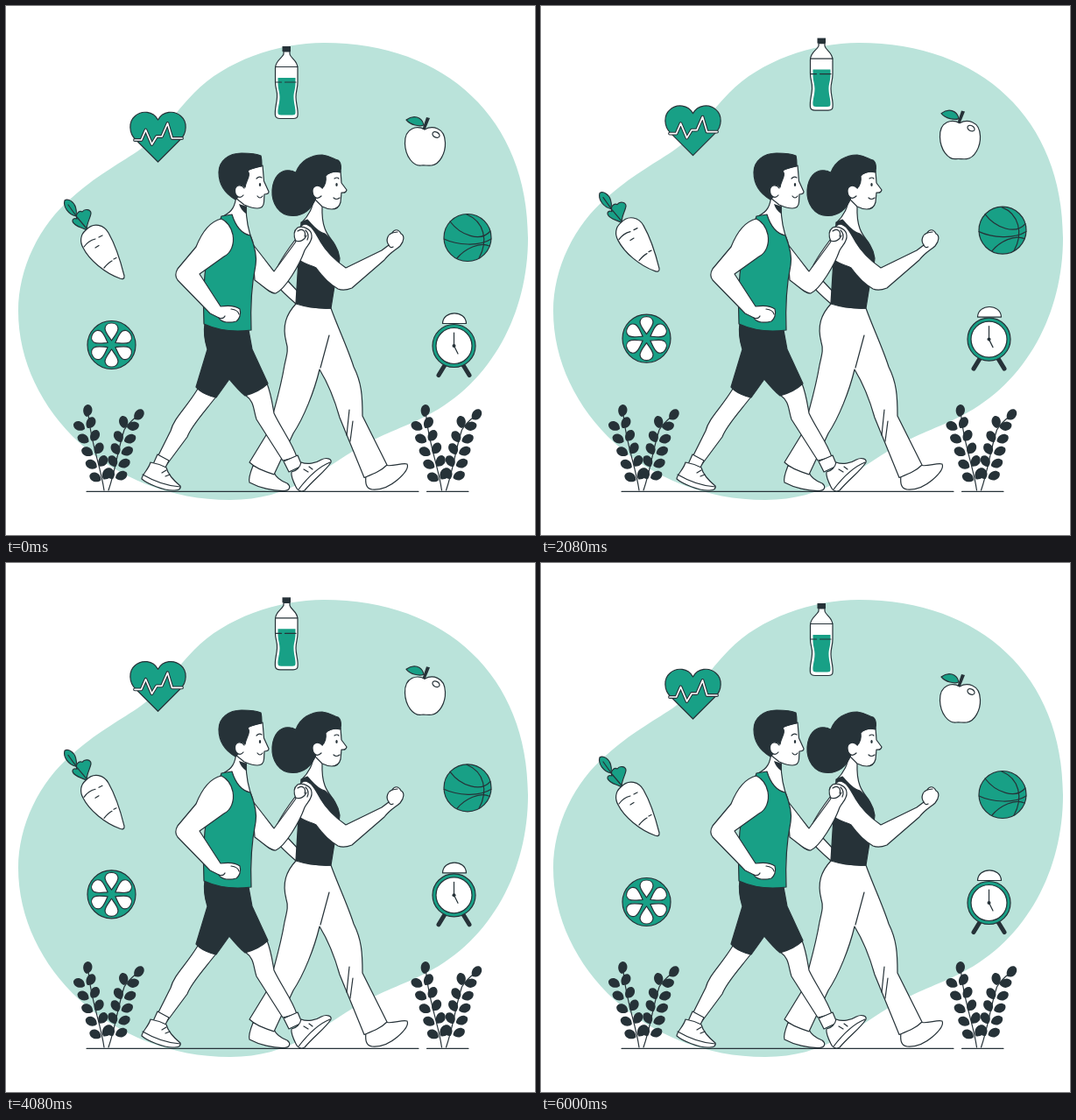
An HTML page with a canvas that plays this animation: 604 px wide and 604 px high, repeating every 6040 ms.

```html
<!DOCTYPE html>
<html lang="en">
<head>
<meta charset="utf-8">
<title>Walking together</title>
<style>
html, body { margin: 0; width: 100%; height: 100%; overflow: hidden; background: #fff; }
canvas { display: block; width: 604px; height: 604px; }
</style>
</head>
<body>
<canvas id="stage"></canvas>
<script>
const SIZE = 604, LOOP = 6040, RISE = 12.08;
const INK = '#263238', GREEN = '#18a086', MINT = '#bae3da', WHITE = '#fff';
const canvas = document.getElementById('stage');
const ratio = window.devicePixelRatio || 1;
canvas.width = canvas.height = Math.round(SIZE * ratio);
const ctx = canvas.getContext('2d');

function shape(d, fill, stroke = INK, width = 1.2) {
  const path = new Path2D(d);
  if (fill) { ctx.fillStyle = fill; ctx.fill(path); }
  if (stroke) { ctx.strokeStyle = stroke; ctx.lineWidth = width; ctx.stroke(path); }
}
const line = (d, width = 1.2, color = INK) => shape(d, null, color, width);

function oval(x, y, rx, ry, fill, turn = 0, stroke = INK) {
  ctx.beginPath();
  ctx.ellipse(x, y, rx, ry, turn, 0, Math.PI * 2);
  if (fill) { ctx.fillStyle = fill; ctx.fill(); }
  if (stroke) { ctx.strokeStyle = stroke; ctx.lineWidth = 1.2; ctx.stroke(); }
}

function at(x, y, turn, draw) {
  ctx.save();
  ctx.translate(x, y);
  ctx.rotate(turn);
  draw();
  ctx.restore();
}

// Each leaf grows from its base towards an angle in degrees.
function leaf(x, y, angle) {
  at(x, y, angle * Math.PI / 180, () =>
    shape('M0 0C2 -5.500 11 -7.500 14 -1.500C15 2.500 10.500 6 6 5C3 4.500 1 2 0 0Z', INK, null));
}

function plant() {
  line('M112 553C108 525 97 500 94 466');
  line('M117 553C125 530 128 505 135 484C139 477 145 472 150 468');
  leaf(92, 469, -80);
  for (let i = 0; i < 5; i++) {
    const x = 92 + i * 4.6, y = 483 + i * 14.6;
    leaf(x - 2, y, 208);
    leaf(x + 1, y - 1, -58);
  }
  leaf(147, 472, -48);
  leaf(135, 482, -96);
  leaf(138, 481, -10);
  for (let i = 0; i < 4; i++) {
    const x = 132 - i * 3.3, y = 498 + i * 14;
    leaf(x, y, -118);
    leaf(x + 3, y - 1, -22);
  }
}

function blob() {
  shape('M14 348C14 300 38 250 75 219C103 194 126 182 150 166C181 145 190 124 215 99C250 63 310 42 363 42C503 42 596 130 596 265C596 350 555 430 480 468C455 481 438 485 405 503C360 529 325 564 256 564C120 564 14 462 14 348Z', MINT, null);
}

function heart() {
  shape('M173.500 178L148 152.500C140 145 140 132 147 126C155 118.500 168 120 173.500 130C179 120 192 118.500 200 126C207 132 207 145 199 152.500Z', GREEN);
  const beat = 'M147 153H154.500L159.500 141.500L166.500 158L172 149H178L184.500 134L189.500 151H201';
  line(beat, 3.8);
  line(beat, 1.7, WHITE);
}

function bottle() {
  shape('M317 52V55C315 60 307.500 62 307.500 71V87C307.500 95 310 96 309.500 104C309 112 306.500 118 307.500 125C308 128 311 128.500 313 128.500H328C331 128.500 333 128 333 125C334 118 331 112 331 104C331 96 333 95 333 87V71C333 62 325 60 324 55V52Z', WHITE);
  shape('M310.500 82H330.500V88C330.500 95 328.500 98 328.500 104C328.500 111 331 117 330.500 122Q330.500 124.500 327 124.500H314Q310.500 124.500 310.500 122C310 117 312.500 111 312.500 104C312.500 98 310.500 95 310.500 88Z', GREEN, null);
  line('M307.500 69.500H333M308 87H314.500M318.500 87H331');
  shape('M315.500 46H325V52H315.500Z', INK, null);
}

function apple() {
  shape('M478 141C470 136.500 455 138 455.500 157C456 172 465 183 474 182C478 181.500 481 182.500 486 182C495 181 502 168 501.500 156C501 138 486 136.500 478 141Z', WHITE);
  shape('M477 136C472 138 462 136 457 130C465 124 475 126 477 136Z', GREEN);
  shape('M475.500 140.500L480 127L484 128L478.500 141.500Z', INK, null);
  oval(491, 147, 4.3, 3, WHITE, 0.5);
}

function ball() {
  oval(527, 264.5, 27, 27, GREEN);
  line('M507 246C519 262 542 270 553 257');
  line('M500 266C515 273 540 275 554 266');
  line('M515 288C524 277 541 269 552 274');
  line('M526 238C546 246 551 268 540 288');
}

function carrot() {
  shape('M80 240C71 238 65 229 67 222C71 219 78 224 79.500 230C81 234 80.500 237 80 240Z', GREEN);
  shape('M92 256C88 253 78 252 76 246C75.500 243 78 242 81 243C79 238 83 233 87 235C90 231 97 232 97 237C96 243 92 248 92 256Z', GREEN);
  line('M71 227L81 241L92 254');
  shape('M91 256C100 246 112 250 117 259C125 273 131 292 135 308C135.500 312 133 312 130 311C113 305 95 290 88 276C84 269 85 261 91 256Z', WHITE);
  line('M89 275Q94 268 102 266M106 264L110 262M102 276L106 273.500M112 299Q117 293 121 291M123 289L126 287.500');
}

function citrus() {
  oval(120.5, 387, 27.5, 27.5, GREEN);
  for (let i = 0; i < 6; i++) {
    at(120.5, 387, i * Math.PI / 3, () =>
      shape('M0 -5C-2.500 -9 -7.500 -14 -7.500 -19C-7 -23 -3.500 -25 0 -25C3.500 -25 7 -23 7.500 -19C7.500 -14 2.500 -9 0 -5Z', WHITE));
  }
}

function clock() {
  line('M501 410L494 421.500M522 410L529 421.500', 5);
  oval(511.5, 388, 24.5, 24.5, GREEN);
  oval(511.5, 388, 20.5, 20.5, WHITE);
  shape('M498.500 362.500C499 347 525 347 525.500 362.500Z', WHITE);
  line('M511.500 373V388L516 397');
  oval(511.5, 388, 2, 2, INK, 0, null);
}

function woman() {
  shape('M334 262C323 276 311 292 306 307C305 315 309 321 331 340L335 328L321 313L336 292Z', WHITE);
  shape('M282 525C278 535 277 541 278 544C289 550 305 554 318 553.500C325 553 325 548 321 545C313 542 308 537 306 533Z', WHITE);
  shape('M411 536C410 545 411 551 418 552C430 553 440 547 447 541C455 534 460 527 458 523C452 521 440 527 432 524Z', WHITE);
  shape('M331 340Q350 346 371 345C378 365 390 390 397 412C406 430 407 445 407 468L435 524C428 531 420 534 409 538.500L381 470C374 445 366 428 358 415C352 440 340 470 328 488L306 535C295 531 285 528 278 521L300 485C306 460 313 440 318 410C320 400 323 393 320 384C315 365 320 352 331 340Z', WHITE);
  line('M369 376L359 413M392 461L389 490M396 474L393 497');
  shape('M352 215C351 230 346 239 337 248L334 270L370 285L374 270C368 262 360 255 361 229Z', WHITE);
  shape('M337 247L344 244C350 250 355 258 364 260C372 266 379 275 381 288C380 300 377 309 375 320L371 345Q350 346 331 339L334 290L345 280Z', INK);
  shape('M341 249C331 252 330 270 335 290C342 296 350 296 354 299C362 310 372 319 379 323C384 325 390 324 395 322L432 290C439 281 446 278 450 274C455 268 455 262 451 260C448 254 443 255 441 259C436 261 433 267 437 273L429 279L388 299C378 292 366 281 359 269C353 258 349 250 341 249Z', WHITE);
  line('M441 259L447 258M437 273Q439 277 442 275');
  shape('M355 205C359 194 366 190 382 188L383 202L389 210Q388 214 383 213L382 224Q380 232 372 232C367 232 363 230 361 229L352 220Z', WHITE);
  shape('M331 190C336 177 348 170 361 170C370 171 374 175 379 176C383 179 383 186 381.500 190C374 188 369 190 365 194C366 201 364 205 361 208C357 203 350 205 350 211C350 215 351 218 354 219C350 229 343 239 328 239.500C312 240 303 225 304 210C305 197 312 186 325 188C328 188 329 190 331 190Z', INK);
  shape('M361 208C357 203 350 205 350 211C350 218 355 222 360 217', WHITE);
  oval(377.5, 204, 1.2, 2, INK, 0, null);
  line('M375 197Q378 195 380 197M374 219Q377 222 381 219');
}

function manArm() {
  shape('M281 271C289 281 299 294 306 303L331 269C328 262 329 256 333 253C340 250 349 256 349 262C350 269 344 273 341 279C335 296 319 323 308 328C302 329 294 320 284 313Z', WHITE);
  line('M331 268C336 270 341 267 343 262M333 257C338 253 343 257 341 263M342 256Q347 261 344 267');
}

function manLegs() {
  shape('M219 437C205 460 192 470 188 485L172 517L184 523L207 492C211 480 226 464 240 446Z', WHITE);
  shape('M173 512L168 523L181 529L186 519Z', WHITE);
  shape('M165 521C171 522 177 524 183 527C185 535 193 543 199 548C200 552 197 553 190 553C180 553 162 546 155 540C155 535 163 529 165 521Z', WHITE);
  line('M156 535C168 542 181 548 199 549M178 533L183 530M182 537L187 535');
  shape('M273 444C284 452 282 460 286 472L316 519L332 515C327 499 314 482 306 465C304 454 303 444 298 431Z', WHITE);
  shape('M317 520L333 513L338 525L323 532Z', WHITE);
  shape('M326 532C332 531 336 526 337 521C344 524 354 522 360 518C366 515 372 517 371 521C366 530 352 540 341 553C337 555 333 554 331 549C329 545 325 537 326 532Z', WHITE);
  line('M334 552C344 539 357 526 370 521M340 529L345 532M346 526L350 529');
  shape('M227 362C225 377 228 385 230 392L217 435C223 442 234 446 240 447L255 426C260 432 268 441 273 445C283 442 293 437 299 431L281 392L277 370Z', INK);
}

function man() {
  manArm();
  manLegs();
  shape('M263 215C262 229 258 235 248 240L262 266L282 270C277 258 274 246 274 227Z', WHITE);
  shape('M266 226L275 229L274 237Q268 233 266 226Z', INK, null);
  shape('M246 240L258 238C262 251 269 260 279 262C283 272 287 285 285 296C280 320 279 345 280 370Q250 374 226 363C225 340 226 310 229 290Z', GREEN);
  shape('M246 243C232 246 223 260 217 275L196 300C193 305 193 309 196 313L233 351L243 356C246 362 256 362 263 360C266 358 269 352 267 346C262 342 252 342 245 343L221 306L249 286C257 282 261 272 259 261C257 252 252 246 246 243Z', WHITE);
  line('M257 346Q265 347 266 352M243 356Q248 358 250 354');
  shape('M263 205L277 187L293 182L294.500 200L300 212Q300 215 295 215L294.500 224Q294 231 287 231C281 231 277 229 272 227L262 219Z', WHITE);
  shape('M262 221C250 214 243 203 243 190C243 177 254 168 269 168C279 168 287 169 291 171C292 175 292 179 292 183C285 184 279 186 276 188C280 194 274 199 273 207C270 203 264 203 261.500 208C259.500 213 262 217 265 218Z', INK);
  shape('M272 208C269 203 262 204 261.500 210C261 217 267 221 271 216', WHITE);
  oval(290, 204, 1.2, 2, INK, 0, null);
  line('M286 197Q289 194 292 196M287 217Q290 221 293 217');
}

const icons = [
  [heart, 3000], [bottle, 1500], [apple, 3000], [ball, 6000],
  [carrot, 6000], [citrus, 3000], [clock, 3000]
];

// Steady rise to the top and back over one period.
function lift(time, period) {
  const phase = (time % period) / period;
  return -RISE * (1 - Math.abs(1 - 2 * phase));
}

// 24 pictures a second, with start times rounded to 10 ms.
function stepTime(ms) {
  const tick = Math.floor(ms / 10) * 10;
  return (Math.ceil((tick + 5) * 3 / 125) - 1) * 125 / 3;
}

function paint(time) {
  ctx.setTransform(ratio, 0, 0, ratio, 0, 0);
  ctx.lineJoin = ctx.lineCap = 'round';
  ctx.fillStyle = WHITE;
  ctx.fillRect(0, 0, SIZE, SIZE);
  blob();
  line('M92 554.300H471M480.500 554.300H528');
  plant();
  at(385.5, 0, 0, plant);
  for (const [draw, period] of icons) at(0, lift(time, period), 0, draw);
  woman();
  man();
}

const start = performance.now();
function frame() {
  paint(stepTime((performance.now() - start) % LOOP));
  requestAnimationFrame(frame);
}
frame();
</script>
</body>
</html>
```
